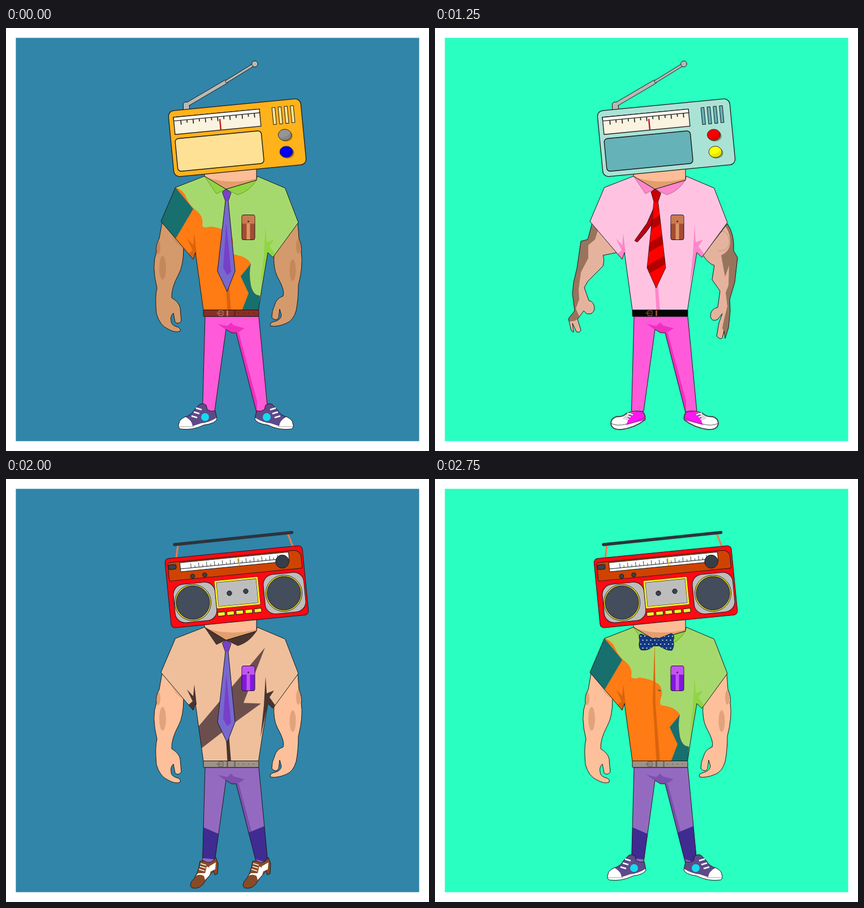
An HTML page with a canvas for the animation above (3000 ms loop, 748x748 px).

```html
<!DOCTYPE html>
<html lang="en">
<head>
<meta charset="utf-8">
<title>Radio heads</title>
<style>
html, body { margin: 0; width: 100%; height: 100%; overflow: hidden; background: #fff; }
canvas { display: block; width: 100%; height: 100%; }
</style>
</head>
<body>
<canvas id="stage" width="748" height="748"></canvas>
<script>
const ctx = document.getElementById('stage').getContext('2d');
const INK = '#1c1a1c';

function shape(d, fill, line, w = 1) {
  const p = new Path2D(d);
  if (fill) { ctx.fillStyle = fill; ctx.fill(p); }
  if (line) { ctx.strokeStyle = line; ctx.lineWidth = w; ctx.stroke(p); }
}
function box(x, y, w, h, r, fill, line, lw = 1) {
  ctx.beginPath();
  ctx.roundRect(x, y, w, h, r);
  if (fill) { ctx.fillStyle = fill; ctx.fill(); }
  if (line) { ctx.strokeStyle = line; ctx.lineWidth = lw; ctx.stroke(); }
}
function oval(x, y, rx, ry, fill, line, lw = 1) {
  ctx.beginPath();
  ctx.ellipse(x, y, rx, ry, 0, 0, Math.PI * 2);
  if (fill) { ctx.fillStyle = fill; ctx.fill(); }
  if (line) { ctx.strokeStyle = line; ctx.lineWidth = lw; ctx.stroke(); }
}
function rod(x1, y1, x2, y2, w, fill, line) {
  const seg = (color, width) => {
    ctx.strokeStyle = color;
    ctx.lineWidth = width;
    ctx.beginPath();
    ctx.moveTo(x1, y1);
    ctx.lineTo(x2, y2);
    ctx.stroke();
  };
  if (line) seg(line, w + 1.6);
  seg(fill, w);
}
function clipped(d, draw) {
  ctx.save();
  ctx.clip(new Path2D(d));
  draw();
  ctx.restore();
}
function tilted(x, y, deg, draw) {
  ctx.save();
  ctx.translate(x, y);
  ctx.rotate(deg * Math.PI / 180);
  draw();
  ctx.restore();
}

// Heads
function radio(c) {
  const metal = '#bab8b2';
  ctx.lineCap = 'round';
  box(313.5, 131, 11, 18, 4, metal, INK);
  rod(319, 136, 388, 95.5, 6, metal, INK);
  rod(390, 94.5, 437, 65.5, 3.4, metal, INK);
  oval(319, 136, 4.5, 4.5, metal);
  oval(440, 63.5, 5.3, 5.3, metal, INK);
  ctx.lineCap = 'butt';
  tilted(409, 194, -5.5, () => {
    box(-117.5, -58.5, 235, 117, 10, c.body, INK, 1.3);
    box(-109, -46.7, 152.7, 30.5, 0, '#faf3e0', INK, 1.3);
    box(-109, -46.7, 152.7, 6.5, 0, '#fffaf0', INK, 1.3);
    for (let i = 0; i < 13; i++) {
      const x = -96.5 + i * 10.88;
      rod(x, -40, x, i % 2 ? -35 : -32.5, 1.6, INK);
    }
    rod(-27.6, -36, -27.6, -16.8, 2.4, '#c81414');
    box(-110, -8.5, 153, 58, 6, c.panel, INK, 1.4);
    for (let i = 0; i < 4; i++) box(66 + i * 10.9, -47, 5.4, 30, 0, c.panel, INK, 1);
  });
  c.knobs.forEach((color, i) => {
    const x = 493 + i * 2.7, y = 189 + i * 30;
    oval(x + 2, y + 2, 12, 10, 'rgba(60,50,10,.4)');
    oval(x, y, 11.6, 10, color, '#332e20');
    shape(`M${x - 10} ${y + 5}Q${x + 6} ${y + 4} ${x + 10} ${y - 5}Q${x + 13} ${y + 8} ${x} ${y + 10}Z`, 'rgba(0,0,0,.09)');
  });
}
function boombox(c) {
  const dark = '#434d5b';
  rod(304, 117, 301, 140, 3, '#f47a4e');
  rod(498, 96, 507, 119, 3, '#f47a4e');
  ctx.lineCap = 'round';
  rod(298, 116, 505.5, 94.5, 5.5, '#2d343c');
  ctx.lineCap = 'butt';
  tilted(408, 190.5, -5.6, () => {
    box(-122, -61.5, 244, 123, 7, c.body, INK);
    box(-117.5, -54, 236, 32.5, [4, 12, 2, 2], c.top, INK);
    box(-96, -52, 193, 16, 0, '#fff', INK);
    rod(-96, -41, 96, -41, 1, INK);
    for (let i = 0; i < 23; i++) {
      const x = -77 + i * 7;
      rod(x, -41, x, i % 2 ? -45 : -49, .8, INK);
    }
    rod(8.5, -51, 8.5, -37, 1.7, '#d6c414');
    box(-117, -50, 14, 8.5, 3.5, '#39424d', INK);
    box(-113, -13.5, 74, 68, 18, '#bdbdbd', INK);
    box(47, -15.5, 72, 70, 18, '#bdbdbd', INK);
    box(-37, -12.5, 74, 46, 0, '#bdbdbd', INK, 4);
    box(-37, -12.5, 74, 46, 0, null, c.trim, 3);
    for (let i = 0; i < 5; i++) box(-38 + i * 16.2, 42, 12.8, 6.8, 0, c.trim, INK);
  });
  [[330.5, 218.5], [491.5, 202]].forEach(([x, y]) => {
    oval(x, y, 32, 32, c.ring, INK);
    oval(x, y, 29.7, 29.7, dark, INK);
  });
  oval(488.5, 146, 11.7, 11.7, '#363e49', INK);
  [[330, 172, 3.8], [351.5, 169.5, 3.8], [395, 202, 4.2], [424, 198.5, 4.2]]
    .forEach(([x, y, r]) => oval(x, y, r, r, '#39424d', INK));
}

// Body
function neck() {
  shape('M351 248V263L389 285L443 268V245Z', '#fcbd97', INK);
  shape('M353 264Q398 278 443 266V269L389 285Z', '#e29e6c');
}
const TORSO = 'M351 262L299.5 282L274 342L331 409L335 397L349 499H446.5L453 456L463 397L472 405.5L517 344L493.5 283L444 262L443 269L389 285Z';
const BLOB = 'M299 281Q314 288 317 296Q324 314 339 325Q350 335 347 350Q351 355 362 351Q385 354 397 364Q404 376 400 386Q396 395 400 400Q426 403 433 417Q429 433 433 455Q437 473 449 473L447 500H348L335 409L331 411L270 342Z';

function shirt(s) {
  const right = s.shade, left = s.blobShade || s.shade;
  shape(TORSO, s.base);
  clipped(TORSO, () => {
    if (s.blob) shape(BLOB, s.blob);
    if (s.patch) clipped(BLOB, () => {
      shape('M290 270L331 320L299 374L260 342Z', s.patch);
      shape('M440 408L415 439L429 469L417 500H450V408Z', s.patch);
      shape('M393 372L400 374L397 376Z', s.patch);
    });
    if (s.bolt) shape('M458 298L340 438L346 476L404 431L451 397L420 396Z', s.bolt);
    shape('M333 363L337 398L331 410L322 400L330 393L320 372L331 384Z', left);
    shape('M388.5 288L390 400L398 500H391.5L385 390Z', left);
    shape('M459 349L461 379L474 374L466 386L476 400L471 407L463 398L450 457L456 400Z', right);
  });
  shape('M351 262L372 293L389 285Z', right, 'rgba(20,10,20,.45)', .7);
  shape('M443 269L389 285L410 295Q430 289 443 269Z', right, 'rgba(20,10,20,.45)', .7);
  shape(TORSO, null, INK);
}
function pocket([top, low, strip]) {
  box(417, 330.5, 23, 44, 3, low, INK);
  box(417.5, 331, 22, 15, [3, 3, 0, 0], top);
  box(425.5, 346, 6, 28, 0, strip);
  oval(428.5, 342, 1.3, 1.3, INK);
}
const neckwear = {
  none() {},
  tie() {
    shape('M389 285L382.5 290L388 306L374 430L391 466L405 430L393 306L398 291Z', '#7668cf', INK);
    shape('M389 286L384 290L388 306H393L396 290Z', '#7a3fcb');
    shape('M389.5 345L384 424L391 437L398 431Z', '#7740c8');
  },
  striped() {
    shape('M386 320L375 345L353 376L358 378.5Q374 362 384 346Z', '#bd0010', INK);
    const d = 'M389 284.5L382 290L387 307L375 424L391 460L408 424L394.5 307L399.5 292Z';
    shape(d, '#f00');
    clipped(d, () => {
      shape('M380 284H402L395 308H386Z', '#c80000');
      for (let y = 334; y < 440; y += 38) shape(`M370 ${y + 13}L412 ${y - 11}V${y + 5}L370 ${y + 29}Z`, '#b40000');
    });
    shape(d, null, INK, .8);
  },
  dotted() {
    const d = 'M386 282L364 274Q359 275 362 285Q359 297 364 302Q376 305 387 295H396Q410 304 419 303Q424 295 421 286Q425 276 418 273L396 282Z';
    shape(d, '#123a82', '#0b2350');
    clipped(d, () => {
      for (let i = 0; i < 4; i++)
        for (let j = 0; j < 9; j++) oval(364 + j * 7 + (i % 2) * 3.5, 278 + i * 7, 1.1, 1.1, '#f4f6ff');
    });
    box(386, 281, 10, 14, 3, null, '#0b2350');
  },
  white() {
    shape('M385 283L368 271Q368 280 365 290Q371 294 370 301L386 293H397L416 301Q413 294 419 290Q415 280 416 271L397 283Z', '#fff', '#ccc', .6);
    oval(391.5, 288, 8, 5.5, '#fff', '#9a8c7c', .8);
  }
};
function sash(color) {
  shape('M480 277C468 345 408 391 338 410L341 436Q438 425 471 371Z', color, INK);
  shape('M480 277Q472 300 471 371L466 477Q479 484 491 479Q499 477 499 430Q503 320 494 283Z', color, INK);
}
const arms = {
  smooth(skin) {
    shape('M276 344L271 372Q264 385 266 396Q257 420 267 460Q263 475 266 505Q272 526 286 532Q300 540 308 536Q310 530 301 528Q292 525 292 518Q290 510 296 504L299 520Q305 525 310 518Q309 508 308 495Q306 485 293 477Q292 460 305 436Q314 420 314 388Z', skin, INK);
    shape('M516 345L518 372Q524 385 522 396Q526 420 517 455Q517 480 513 500Q508 517 496 522Q480 529 468 527Q465 521 475 519Q486 516 487 508L484 497L482 512Q478 520 470 512Q470 500 475 490Q478 478 490 474Q494 465 480 440Q472 425 474 398Z', skin, INK);
    const tone = 'rgba(150,85,40,.27)';
    oval(277, 424, 6, 21, tone);
    oval(269, 388, 4, 12, tone);
    oval(507, 428, 5.5, 19, tone);
    oval(517, 386, 4, 13, tone);
    shape('M292 365L314 392L300 378Z', tone);
  },
  lean() {
    const skin = '#e5b39d', tone = '#98745c';
    const left = 'M278 344L274 360L270 374L258 377L251 425L245 450L243 470L247 500L236 514L241 535L245 538L243 522L250 537Q256 540 258 534L252 515L263 500L268 505Q279 508 282 497Q282 484 272 482L264 459L270 448L297 421Q300 410 297 402L322 397Z';
    const right = 'M517 346Q530 365 528 394L535 406L530 450L521 480L522 500L519 530L513 549L511 536L508 548Q505 552 498 545L502 522L508 505L500 515Q490 521 487 510Q487 497 500 494L504 465L490 445L494 420Q484 417 474 402Z';
    shape(left, skin);
    clipped(left, () => shape('M270 340L288 358L283 374L271 384V407L258 432L254 462L255 480L249 496L256 512L247 518L230 520V370Z', tone));
    shape(right, skin);
    clipped(right, () => shape('M508 345Q522 357 522 380Q521 395 506 402L513 440L520 420L519 455L514 468L517 492L512 512L508 530L515 550L540 530V340Z', tone));
    shape('M505 361Q518 355 521 380Q518 396 500 394', null, '#b98b76', .8);
    shape(left, null, INK);
    shape(right, null, INK);
  }
};

function belt([color, metal]) {
  box(349, 498.5, 98, 11.5, 1, color, INK);
  box(376, 500, 8, 8.5, 2, null, metal, 1.3);
  rod(372, 504.3, 382, 504.3, 1.2, metal);
  box(390, 499.3, 3, 10, 0, metal);
  box(403, 499.3, 3, 10, 0, 'rgba(0,0,0,.25)');
  for (let x = 411; x < 440; x += 9) oval(x, 504.3, .8, .8, 'rgba(0,0,0,.5)');
}

const LEGS = 'M352 510L347.5 677Q358 683 369 677L389 533L399 539H407L443 680Q454 684 463 678L447 510Z';
const pants = {
  pink: { base: '#ff5ad9', shade: '#f02fc0' },
  cyan: { base: '#3fdaf2', shade: '#2bbdd6', extra() {
    ['M378 561Q363 571 349 578V599Q371 585 378 561Z', 'M370 590Q357 600 348 605V626Q366 610 370 590Z', 'M367 617Q356 626 347 631V651Q363 637 367 617Z',
      'M426 555Q440 566 454 573L455 595Q436 580 426 555Z', 'M435 585Q446 596 457 602V626Q442 610 435 585Z', 'M441 613Q450 622 459 627L460 644Q446 633 441 613Z']
      .forEach(d => shape(d, '#3029c4'));
  } },
  purple: { base: '#9b19e0', shade: '#7f12c0', extra() {
    for (let i = 0; i < 4; i++) rod(408, 557 + i * 6.5, 456, 544.5 + i * 6.5, 3.6, '#fb52ac');
  } },
  cuffed: { base: '#946ac0', shade: '#7d4fae', extra() {
    shape('M345 614L377 628L371 673L345 670Z', '#402b92');
    shape('M427 626L459 613L465 680L441 672Z', '#402b92');
  } }
};
function trousers(p) {
  shape(LEGS, p.base);
  clipped(LEGS, () => {
    shape('M374 523L391 527L398 521L403 526L422 531L408 540H399L388 533Z', p.shade);
    shape('M405 535L412 540L444 660V685Z', p.shade);
    if (p.extra) p.extra();
  });
  shape(LEGS, null, INK);
}

const laces = (list, w, color = '#fff') => list.forEach(([x, y]) => rod(x, y, x + 10, y + 3, w, color));
const shoes = {
  skate() {
    const d = 'M342 666Q347 662 354 667L356 675Q362 679 370 677L373 691Q371 699 350 702Q330 712 308 709Q303 706 306 699Q306 693 316 688Q328 685 334 674Z';
    shape(d, '#5d4a8a');
    clipped(d, () => {
      shape('M300 685L318 688Q329 694 330 704L345 699Q360 698 376 687V715H300Z', '#fff');
      rod(306, 705, 332, 705, .7, '#777');
    });
    shape(d, null, INK);
    oval(352, 688, 7, 7, '#12dcec');
    laces([[336, 672], [332, 679], [328, 686]], 2.8);
  },
  canvas() {
    const d = 'M338 682Q353 675 368 679Q373 686 371 693Q355 706 330 710Q312 711 311 699Q311 690 322 687Q332 688 338 682Z';
    shape(d, '#fff');
    clipped(d, () => {
      shape('M347 680L376 674V692L338 702Q343 692 340 687Z', '#ff16f2');
      shape('M311 699Q322 705 340 700Q357 697 373 687', null, '#555', 1);
    });
    shape(d, null, '#4c4748', 2);
    laces([[340, 681], [336, 685], [333, 689]], 3, '#666');
    laces([[340, 681], [336, 685], [333, 689]], 2);
  },
  loafer() {
    shape('M321 692L323 702Q345 706 356 699L360 693L370 690V685Z', '#26383d', INK);
    shape('M347 674Q357 683 369 680L370 686L358 692Q345 700 323 698Q319 690 330 686Q341 683 347 674Z', '#315f63', INK);
  },
  runner() {
    const d = 'M346 674Q350 678 358 677L373 674V688Q350 704 335 708Q315 711 313 703Q314 694 330 690Q338 684 346 674Z';
    shape(d, '#fbc93e');
    clipped(d, () => {
      shape('M360 678L376 670V686L362 690Z', '#d4a52c');
      shape('M311 702Q328 706 343 702L375 685V712H311Z', '#fff');
    });
    shape(d, null, INK);
    shape('M348 680L338 684L345 687L334 690L341 693', null, '#fff', 2);
    box(347, 686, 9, 9, 0, '#a65a9c');
  },
  brogue() {
    const d = 'M343 676L350 675Q362 684 371 669L375 680L374 698L369 700L367 693Q355 706 349 716Q341 726 329 723Q324 720 328 712Q340 700 343 676Z';
    shape(d, '#8b4a26');
    clipped(d, () => {
      shape('M334 703Q341 697 350 702L352 709L360 701L363 689L355 685L352 697H340Z', '#fff');
      shape('M359 685L371 678L370 690L362 694Z', '#fff');
    });
    shape(d, null, INK);
    laces([[344, 680], [343, 685], [341, 690]], 1.8, '#fff');
  }
};
function pair(name) {
  shoes[name]();
  ctx.save();
  if (name === 'brogue') ctx.translate(93, 0);
  else {
    ctx.translate(name === 'skate' ? 813 : 812, 0);
    ctx.scale(-1, 1);
  }
  shoes[name]();
  ctx.restore();
}

// Wardrobe
const heads = {
  amber: () => radio({ body: '#ffb21a', panel: '#ffe195', knobs: ['#969696', '#0000fa'] }),
  mint: () => radio({ body: '#aae3d6', panel: '#65b2b9', knobs: ['#f80000', '#ffff00'] }),
  navy: () => boombox({ body: '#2a4c92', top: '#fb1c1c', trim: '#22d3c0', ring: '#d000d8' }),
  red: () => boombox({ body: '#ff0a14', top: '#cf4300', trim: '#fff02a', ring: '#fff02a' })
};
const shirts = {
  lime: { base: '#a6d96d', shade: '#90d544', blob: '#ff7b14', blobShade: '#d9640c', patch: '#176f6e' },
  rose: { base: '#ffc3e1', shade: '#ff86cb' },
  bolt: { base: '#efbf9b', shade: '#493432', bolt: '#6c4f4d' },
  lilac: { base: '#bb8cf2', shade: '#a10cec' },
  sea: { base: '#b2b7a3', shade: '#92977f', blob: '#1769ae', blobShade: '#07256f' },
  fire: { base: '#ff0057', shade: '#d3155a', blob: '#fff700', blobShade: '#cbc22b' }
};
const pockets = {
  tan: ['#c97a50', '#a24d30', '#dc9567'],
  violet: ['#c254f0', '#8118de', '#c254f0'],
  blush: ['#ffb0cd', '#a983c4', '#ffb0cd'],
  dusk: ['#9a72ae', '#403f8c', '#9a72ae']
};
const belts = {
  brown: ['#8a2e22', '#b8785c'], black: ['#050505', '#9b4c34'], plum: ['#7d315b', '#55203c'],
  slate: ['#59695f', '#39443f'], gold: ['#4f3f2f', '#d29a4c'], steel: ['#151515', '#c4c4c4'], grey: ['#9d928b', '#6c625d']
};
const TAN = '#d59a6b', FAIR = '#fdc09a';

// background, head, shirt, neckwear, pocket, sash, smooth-arm skin, belt, pants, shoes
const looks = [
  ['#3085a9', 'amber', 'lime', 'tie', 'tan', 0, TAN, 'brown', 'pink', 'skate'],
  ['#ffca08', 'navy', 'sea', 'white', 'violet', 0, FAIR, 'gold', 'cuffed', 'runner'],
  ['#b4ff98', 'amber', 'rose', 'striped', 'tan', 0, 0, 'black', 'cyan', 'canvas'],
  ['#f28863', 'red', 'lilac', 'dotted', 'blush', 0, TAN, 'slate', 'purple', 'loafer'],
  ['#968c83', 'amber', 'bolt', 'tie', 'violet', 0, TAN, 'plum', 'purple', 'loafer'],
  ['#29ffc1', 'mint', 'rose', 'striped', 'tan', 0, 0, 'black', 'pink', 'canvas'],
  ['#fbaccd', 'navy', 'lilac', 'dotted', 'blush', '#ffb083', TAN, 'slate', 'pink', 'skate'],
  ['#f28863', 'mint', 'sea', 'white', 'violet', 0, 0, 'gold', 'cyan', 'runner'],
  ['#3085a9', 'red', 'bolt', 'tie', 'violet', 0, FAIR, 'grey', 'cuffed', 'brogue'],
  ['#ffca08', 'mint', 'fire', 'none', 'dusk', '#d2e5e3', 0, 'steel', 'purple', 'brogue'],
  ['#fbaccd', 'amber', 'lime', 'white', 'tan', 0, TAN, 'brown', 'cyan', 'canvas'],
  ['#29ffc1', 'red', 'lime', 'dotted', 'violet', 0, FAIR, 'grey', 'cuffed', 'skate']
];

function draw([bg, head, top, collar, chest, band, skin, waist, legs, feet]) {
  ctx.fillStyle = '#fff';
  ctx.fillRect(0, 0, 748, 748);
  ctx.fillStyle = bg;
  ctx.fillRect(17.4, 17.4, 713.2, 713.2);
  ctx.lineJoin = 'round';
  arms[skin ? 'smooth' : 'lean'](skin);
  neck();
  trousers(pants[legs]);
  pair(feet);
  shirt(shirts[top]);
  belt(belts[waist]);
  pocket(pockets[chest]);
  if (band) sash(band);
  neckwear[collar]();
  heads[head]();
}

let shown = -1;
function tick() {
  const i = Math.floor(performance.now() % 3000 / 250);
  if (i !== shown) draw(looks[shown = i]);
  requestAnimationFrame(tick);
}
tick();
</script>
</body>
</html>
```
